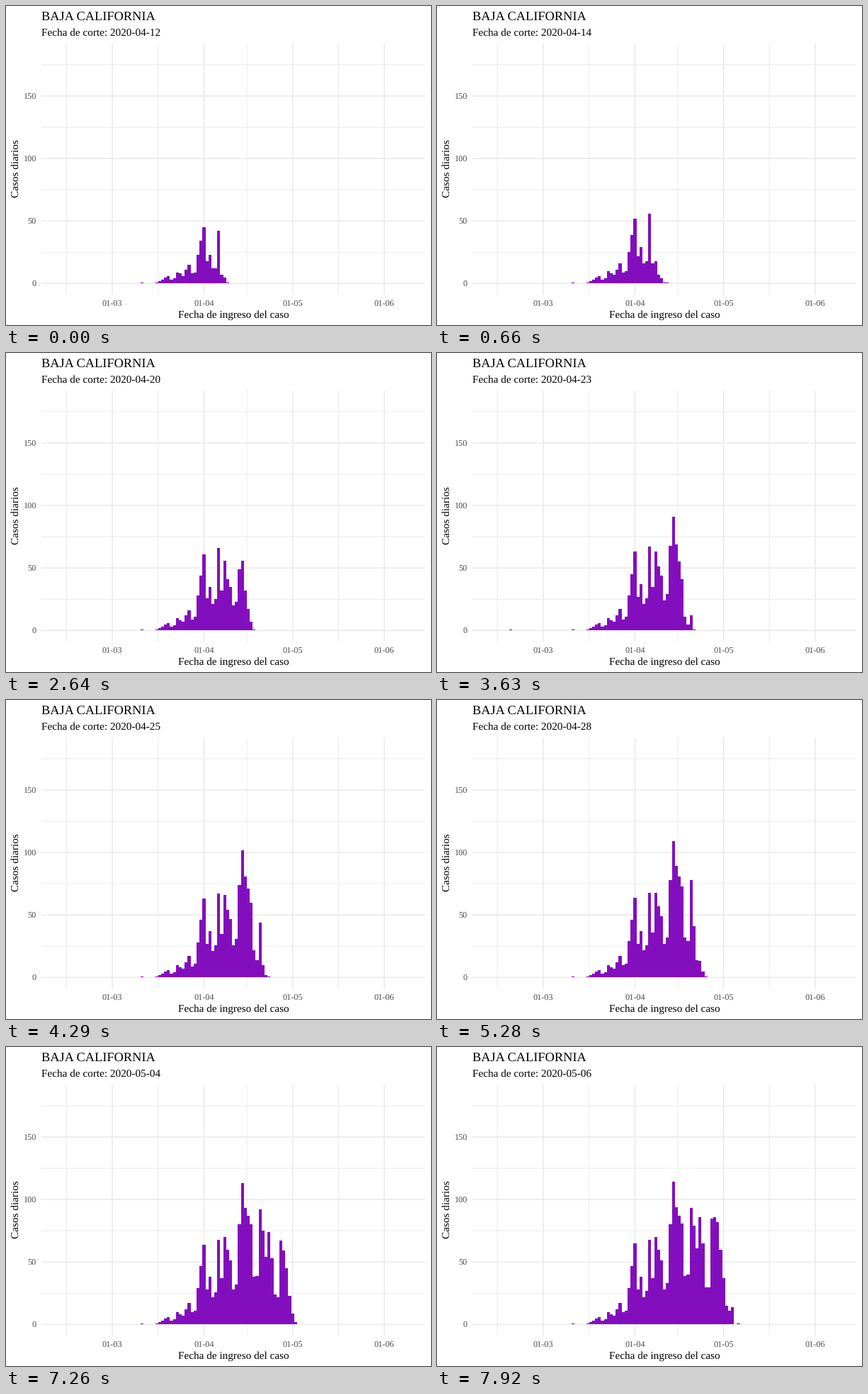
Recreate the animation shown at these times as a matplotlib script. Size 600 px wide and 450 px high, loop 8000 ms.

```python
import numpy as np
import matplotlib.pyplot as plt
from matplotlib.animation import FuncAnimation

plt.rcParams["font.family"] = "Liberation Serif"
plt.rcParams["text.hinting"] = "none"

LOOP, INTERVAL, STEP = 8000, 20, 330      # ms
LEFT, RIGHT, TOP, BOTTOM = 50, 592, 53, 407.3
ZERO, UNIT = 391.4, 1.763                 # y of zero, pixels per case
APRIL, DAY = 279.43, 4.174                # x of 1 April, pixels per day
FIRST, LAST = -41, 36                     # days, where 1 is 1 April
GRID, BAR, TICK = "#ebebeb", "#830ebe", "#4d4d4d"

DAYS = np.arange(FIRST, LAST + 1)

# (day, cases once fully reported) on working days
TREND = [(-16, 0), (-15, 1), (-11, 6), (-8, 10), (-6, 7), (-4, 17), (-1, 29),
         (1, 65), (2, 28), (3, 38), (6, 68), (7, 37), (8, 71), (10, 52),
         (13, 81), (14, 115), (15, 95), (17, 82), (20, 95), (22, 74),
         (23, 108), (24, 85), (27, 106), (29, 130), (31, 108), (34, 120)]
# (day, days until half of its cases are reported)
DELAY = [(0, 9), (5, 7.3), (6, 5.2), (7, 7.5), (9, 9), (12, 6.2), (17, 6),
         (19, 7.2), (20, 5.2), (22, 9), (26, 8.2), (27, 6), (31, 6),
         (34, 3.6)]
WEEKEND = 0.46
# lone cases: day, first and last step on show
STRAYS = [(-20, 0, 24), (-41, 10, 11), (36, 24, 24)]


def day_x(day):
    return APRIL + (day - 1) * DAY


def case_y(cases):
    return ZERO - cases * UNIT


def through(points):
    return np.interp(DAYS, *zip(*points))


weekend = np.isin(DAYS % 7, (4, 5))
total = through(TREND) * np.where(weekend, WEEKEND, 1)
delay = through(DELAY)


def cases_at(step):
    """Reported cases per day: each day fills up along an S-curve."""
    lag = 12 + step - DAYS
    share = 1 / (1 + (delay / np.maximum(lag, 1)) ** 3.5)
    cases = np.where(lag >= 2, np.round(total * share), 0)
    for day, start, end in STRAYS:
        if start <= step <= end:
            cases[day - FIRST] = 1
    return cases


fig = plt.figure(figsize=(6, 4.5), dpi=100, facecolor="white")
ax = fig.add_axes([0, 0, 1, 1])
ax.set(xlim=(0, 600), ylim=(450, 0))
ax.axis("off")


def grid(xs, ys, width):
    style = dict(colors=GRID, linewidths=width, zorder=1, snap=False)
    ax.vlines(xs, TOP, BOTTOM, **style)
    ax.hlines(ys, LEFT, RIGHT, **style)


def label(x, y, text, size=11, color="black", **kw):
    return ax.text(x, y, text, size=size, color=color, va="baseline", **kw)


months = np.array([-30, 1, 31, 62])
values = np.arange(0, 200, 50)
grid(day_x(months - 15.5), case_y(values + 25), 0.72)
grid(day_x(months), case_y(values), 1.2)

for n, d in enumerate(months):
    label(day_x(d), 424, f"01-{n + 3:02d}", 8.8, TICK, ha="center")
for v in values:
    label(43, case_y(v) + 4.8, str(v), 8.8, TICK, ha="right")

label(50, 21, "BAJA CALIFORNIA", 13.2)
label(321, 440, "Fecha de ingreso del caso", ha="center")
label(18, 229.5, "Casos diarios", ha="center", rotation=90,
      rotation_mode="anchor")
subtitle = label(50, 42, "")

edges = day_x(np.arange(FIRST, LAST + 2) - 0.5)
bars = ax.stairs(case_y(cases_at(0)), edges, baseline=ZERO, fill=True,
                 color=BAR, linewidth=0, antialiased=False, zorder=2)


def draw(i):
    step = min((i * INTERVAL + INTERVAL // 2) // STEP, 24)
    day = 12 + step
    month, day = (4, day) if day <= 30 else (5, day - 30)
    subtitle.set_text(f"Fecha de corte: 2020-{month:02d}-{day:02d}")
    bars.set_data(values=case_y(cases_at(step)))
    return subtitle, bars


anim = FuncAnimation(fig, draw, frames=LOOP // INTERVAL, interval=INTERVAL,
                     repeat=True, repeat_delay=0)
plt.show()
```
